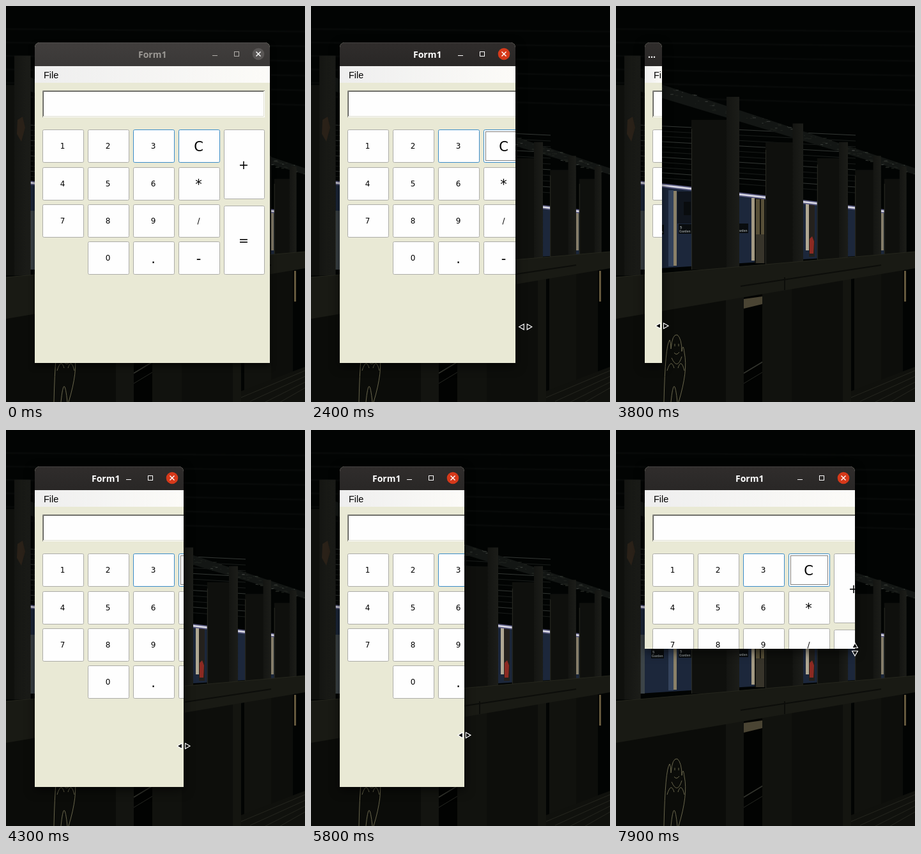
An HTML page with a canvas for the animation above (8000 ms loop, 468 by 619 pixels).

```html
<!DOCTYPE html>
<html lang="en">
<head>
<meta charset="utf-8">
<title>Calculator window</title>
<style>
html, body { margin: 0; width: 100%; height: 100%; overflow: hidden; background: #000; }
canvas { display: block; }
</style>
</head>
<body>
<canvas id="stage" width="468" height="619"></canvas>
<script>
const W = 468, H = 619, LOOP = 8000, STEP = 100;
const LEFT = 45, TOP = 57, BAR = 94, BOTTOM = 558;
const UI = '"DejaVu Sans", sans-serif';
const TITLE = '700 14px "Open Sans", "Noto Sans", sans-serif';
const stage = document.getElementById('stage').getContext('2d');
let ctx = stage;

// Pointer gestures: start, end, destination x and y.
const moves = [
  [300, 500, 228, 422], [600, 900, 368, 540], [1000, 1300, 414, 502],
  [2000, 3290, 72, 500], [3800, 4800, 484, 488], [5000, 5985, 215, 476],
  [5990, 6300, 410, 480], [6400, 6700, 374, 490], [6700, 6900, 361, 543],
  [7400, 7500, 352, 559], [7600, 7900, 374, 343]
];

function ease(t, start, end) {
  const u = Math.max(0, Math.min(1, (t - start) / (end - start)));
  return u * u * (3 - 2 * u);
}

function pointerAt(t) {
  let x = 165, y = 244;
  for (const [start, end, toX, toY] of moves) {
    const u = ease(t, start, end);
    x += (toX - x) * u;
    y += (toY - y) * u;
  }
  return { x, y };
}

// The first drag outruns the window; later ones hold the edge.
function rightAt(t) {
  if (t < 3800) return Math.round(413 - 341 * ease(t, 2000, 3168));
  return Math.round(pointerAt(Math.min(t, 6700)).x);
}

function bottomAt(t) {
  return t < 7600 ? BOTTOM : Math.round(pointerAt(t).y - 1);
}

function rect(fill, x, y, w, h) {
  ctx.fillStyle = fill;
  ctx.fillRect(x, y, w, h);
}

function trace(p) {
  ctx.beginPath();
  for (let i = 0; i < p.length; i += 2) ctx.lineTo(p[i], p[i + 1]);
}

function poly(fill, ...p) {
  trace(p);
  ctx.closePath();
  ctx.fillStyle = fill;
  ctx.fill();
}

function line(color, width, ...p) {
  trace(p);
  ctx.strokeStyle = color;
  ctx.lineWidth = width;
  ctx.stroke();
}

function text(s, x, y, font, color, align = 'left') {
  ctx.font = font;
  ctx.fillStyle = color;
  ctx.textAlign = align;
  ctx.fillText(s, x, y);
}

function random(seed) {
  return () => (seed = seed * 16807 % 2147483647) / 2147483647;
}

function sign(x, y) {
  rect('#090c0e', x, y, 20, 15);
  text('5', x + 2, y + 7, '700 6px "Liberation Sans", sans-serif', '#8f9698');
  text('Garden', x + 1, y + 13, '700 5px "Liberation Sans", sans-serif', '#8f9698');
}

const girder = x => 99 + x * .33;
const lamp = x => 276 + (x - 36) * .117;

function drawTrain() {
  poly('#1c273b', 36, lamp(36), 420, lamp(420), 420, 388, 36, 412);
  rect('#34435c', 82, 288, 8, 119);
  rect('#8a8068', 90, 289, 5, 117);
  rect('#10151d', 96, 290, 22, 50);
  rect('#090c0e', 106, 306, 11, 21);
  rect('#a39a83', 212, 300, 5, 98);
  rect('#11120f', 217, 300, 17, 102);
  rect('#585038', 219, 302, 13, 55);
  line('#15140f', 2, 226, 302, 226, 357);
  rect('#37342a', 219, 357, 13, 45);
  rect('#b0a893', 297, 308, 5, 74);
  rect('#24211d', 302, 308, 9, 84);
  poly('#8c2a22', 303, 364, 307, 360, 310, 368, 309, 387, 303, 387);
  rect('#857d69', 415, 322, 4, 60);
  line('#5f5f86', 6, 36, lamp(36), 420, lamp(420));
  line('#dcdce6', 2.5, 36, lamp(36), 420, lamp(420));
  sign(55, 342);
  sign(98, 341);
  sign(187, 340);
  rect('#3c4448', 37, 320, 8, 92);
  rect('#a5a69c', 37, 320, 1.5, 92);
}

// Pillars shrink toward a vanishing point at (760, 378).
function drawPillar(k) {
  const s = 4.67 / (k + 4.67);
  const right = 760 - 567 * s, width = 75 * s ** 1.24, face = 20 * s;
  const top = 378 - 236 * s, foot = 378 + 34 * s;
  rect('#0f100d', right - width, top + 36 * s, width, foot - top - 36 * s);
  rect('#2a2b24', right - width, top + 50 * s, 1, foot - top - 50 * s);
  const side = ctx.createLinearGradient(right - face, 0, right, 0);
  side.addColorStop(0, '#141512');
  side.addColorStop(1, '#1c1d19');
  rect(side, right - face, top, face, foot - top);
}

function drawLowerWall() {
  rect('#0b0c09', 0, 440, 172, 179);
  rect('#131410', 172, 440, 28, 179);
  rect('#020302', 200, 440, 29, 179);
  poly('#4a4433', 200, 458, 229, 454, 229, 466, 200, 473);
  line('#33352e', 1.5, 200, 574, 230, 556);
  line('#242620', 1, 200, 590, 230, 572);
  rect('#11120e', 229, 430, 46, 189);
  rect('#0d0e0b', 275, 420, 80, 199);
  rect('#141510', 355, 420, 13, 199);
  rect('#11120e', 373, 410, 42, 209);
  rect('#0d0e0b', 415, 400, 34, 219);
  rect('#64583c', 451, 414, 3, 48);
  poly('#10110d', 368, 602, W, 564, W, H, 368, H);
  for (let i = 0; i < 4; i++) line('#25261f', 1, 368 + i * 14, 612 + i * 6, W, 570 + i * 9);
}

function drawChalk() {
  ctx.strokeStyle = '#69664c';
  ctx.lineWidth = 1;
  ctx.stroke(new Path2D(
    'M75 619Q77 530 84 522Q86 526 86 536Q88 512 96 514Q103 520 103 540' +
    'Q105 525 107 542Q113 570 98 619M86 619Q91 570 96 619' +
    'M80 570Q86 550 91 566M97 566Q102 550 107 570' +
    'M87 550Q96 570 103 548M92 528V532M98 528V532M91 542Q95 547 99 541'));
}

function drawBackdrop() {
  const rnd = random(7);
  rect('#020403', 0, 0, W, H);
  for (let i = 0; i < 6; i++) line('#070908', 3, 0, 36 + i * 21, W, 40 + i * 23);
  for (let i = 0; i < 11; i++) {
    const y = 186 + i * 8;
    line(i % 3 ? '#1a1d1b' : '#343835', 1, 36, y, 375, y + 16 + i);
  }
  drawTrain();

  poly('#131614', 36, girder(36), W, girder(W), W, girder(W) + 10, 36, girder(36) + 22);
  for (let i = 0; i < 120; i++) {
    const x = 72 + rnd() * 396;
    rect(rnd() < .2 ? '#3a3e3a' : '#20241f', x, girder(x) + rnd() * 14, 1 + rnd() * 5, 1);
  }
  for (let k = 4; k >= -1; k--) drawPillar(k);
  poly('#2a2118', 18, 178, 26, 173, 30, 190, 24, 212, 17, 200);

  drawLowerWall();
  poly('#191a14', 0, 424, W, 384, W, 410, 0, 489);
  line('#25261d', 1, 0, 424, W, 384);
  line('#0c0d0a', 2, 195, 438, 415, 405);
  line('#0c0d0a', 2, 264, 424, 264, 444);
  drawChalk();
}

function makeBackdrop() {
  const layer = document.createElement('canvas');
  layer.width = W;
  layer.height = H;
  ctx = layer.getContext('2d');
  drawBackdrop();
  ctx = stage;
  return layer;
}

function button(label, x, y, w, h, size, accent) {
  ctx.beginPath();
  ctx.roundRect(x + .5, y + .5, w - 1, h - 1, 2);
  ctx.fillStyle = '#fefefe';
  ctx.fill();
  ctx.lineWidth = 1;
  ctx.strokeStyle = accent ? '#3a8cc8' : '#acaca8';
  ctx.stroke();
  const baseline = Math.round(y + h / 2 + size * .37);
  text(label, x + w / 2 - 1, baseline, size + 'px ' + UI, '#000', 'center');
}

function drawKeys(active) {
  ['123C', '456*', '789/', ' 0.-'].forEach((keys, row) => {
    [...keys].forEach((key, col) => {
      if (key === ' ') return;
      const size = /[\d/]/.test(key) ? 12 : 21;
      button(key, 57 + col * 71, Math.round(193.4 + row * 58.3), 65, 52, size, /[3C]/.test(key));
    });
  });
  button('+', 341, 193, 64, 109, 19);
  button('=', 341, 312, 64, 108, 19);
  if (!active) return;
  ctx.setLineDash([1, 1]);
  ctx.strokeStyle = '#000';
  ctx.strokeRect(273.5, 196.5, 58, 45);
  ctx.setLineDash([]);
}

function fitTitle(room) {
  const name = 'Form1';
  ctx.font = TITLE;
  if (ctx.measureText(name).width <= room) return name;
  let n = name.length - 1;
  while (n > 0 && ctx.measureText(name.slice(0, n) + '…').width > room) n--;
  return name.slice(0, n) + '…';
}

function drawTitleBar(right, active) {
  const ink = active ? '#fff' : '#b2afab';
  const bar = ctx.createLinearGradient(0, TOP, 0, BAR);
  bar.addColorStop(0, active ? '#302d2c' : '#413e3d');
  bar.addColorStop(1, active ? '#292726' : '#3a3837');
  rect(bar, LEFT, TOP, right - LEFT, BAR - TOP);
  rect(active ? '#454241' : '#514e4d', LEFT + 6, TOP, right - LEFT - 12, 1);

  const limit = right - 100;
  const label = fitTitle(limit - 50);
  const half = ctx.measureText(label).width / 2;
  const x = Math.max(50 + half, Math.min((LEFT + right) / 2, limit - half));
  text(label, Math.round(x - half), 81, TITLE, active ? '#fff' : '#9b9894');

  if (right < 100) return;
  rect(ink, right - 90, 77, 8, 1);
  ctx.strokeStyle = ink;
  ctx.lineWidth = 1;
  ctx.strokeRect(right - 55.5, 71.5, 7, 7);
  const cx = right - 18, cy = 75;
  ctx.beginPath();
  ctx.arc(cx, cy, 9.3, 0, 7);
  ctx.fillStyle = active ? '#d6391a' : '#595655';
  ctx.fill();
  for (const d of [-3.5, 3.5]) line('#fff', 1.4, cx - d, cy - 3.5, cx + d, cy + 3.5);
}

function drawWindow(right, bottom, active) {
  const w = right - LEFT;
  ctx.save();
  ctx.beginPath();
  ctx.roundRect(LEFT, TOP, w, bottom - TOP, [8, 8, 0, 0]);
  ctx.save();
  ctx.shadowColor = 'rgba(0,0,0,.6)';
  ctx.shadowBlur = active ? 16 : 10;
  ctx.shadowOffsetY = 5;
  ctx.fillStyle = '#e9e9d5';
  ctx.fill();
  ctx.restore();
  ctx.clip();

  drawTitleBar(right, active);
  const menu = ctx.createLinearGradient(LEFT, 0, right, 0);
  menu.addColorStop(0, '#eeeeee');
  menu.addColorStop(1, '#fcfbf8');
  rect(menu, LEFT, BAR, w, 26);
  text('File', 59, 113, '14.5px "Liberation Sans", sans-serif', '#000');

  rect('#fefefe', 57, 132, 348, 42);
  line('#8b8b83', 1, 57.5, 174, 57.5, 132.5, 405, 132.5);
  line('#55554f', 1, 58.5, 172, 58.5, 133.5, 403, 133.5);
  line('#dedecf', 1, 58, 172.5, 403.5, 172.5, 403.5, 133);
  drawKeys(active);
  ctx.restore();
}

function outline(...p) {
  poly('#000', ...p);
  ctx.strokeStyle = '#fff';
  ctx.lineWidth = 1.2;
  ctx.stroke();
}

function drawPointer(t) {
  if (t < 300) return;
  const { x, y } = pointerAt(t);
  ctx.save();
  ctx.translate(x, y);
  if (t < 1300 || (t >= 6800 && t < 7500)) {
    outline(.6, 1, .6, 16, 4.2, 12.8, 6.8, 18.8, 9.4, 17.6, 6.9, 12, 11.8, 11.6);
  } else {
    if (t >= 7500) ctx.rotate(Math.PI / 2);
    outline(-10, 0, -2.5, -4.3, -2.5, 4.3);
    outline(10, 0, 2.5, -4.3, 2.5, 4.3);
  }
  ctx.restore();
}

const backdrop = makeBackdrop();

function frame(now) {
  const t = Math.floor(now % LOOP / STEP) * STEP;
  ctx.drawImage(backdrop, 0, 0);
  drawWindow(rightAt(t), bottomAt(t), t >= 1800);
  drawPointer(t);
  requestAnimationFrame(frame);
}
requestAnimationFrame(frame);
</script>
</body>
</html>
```
